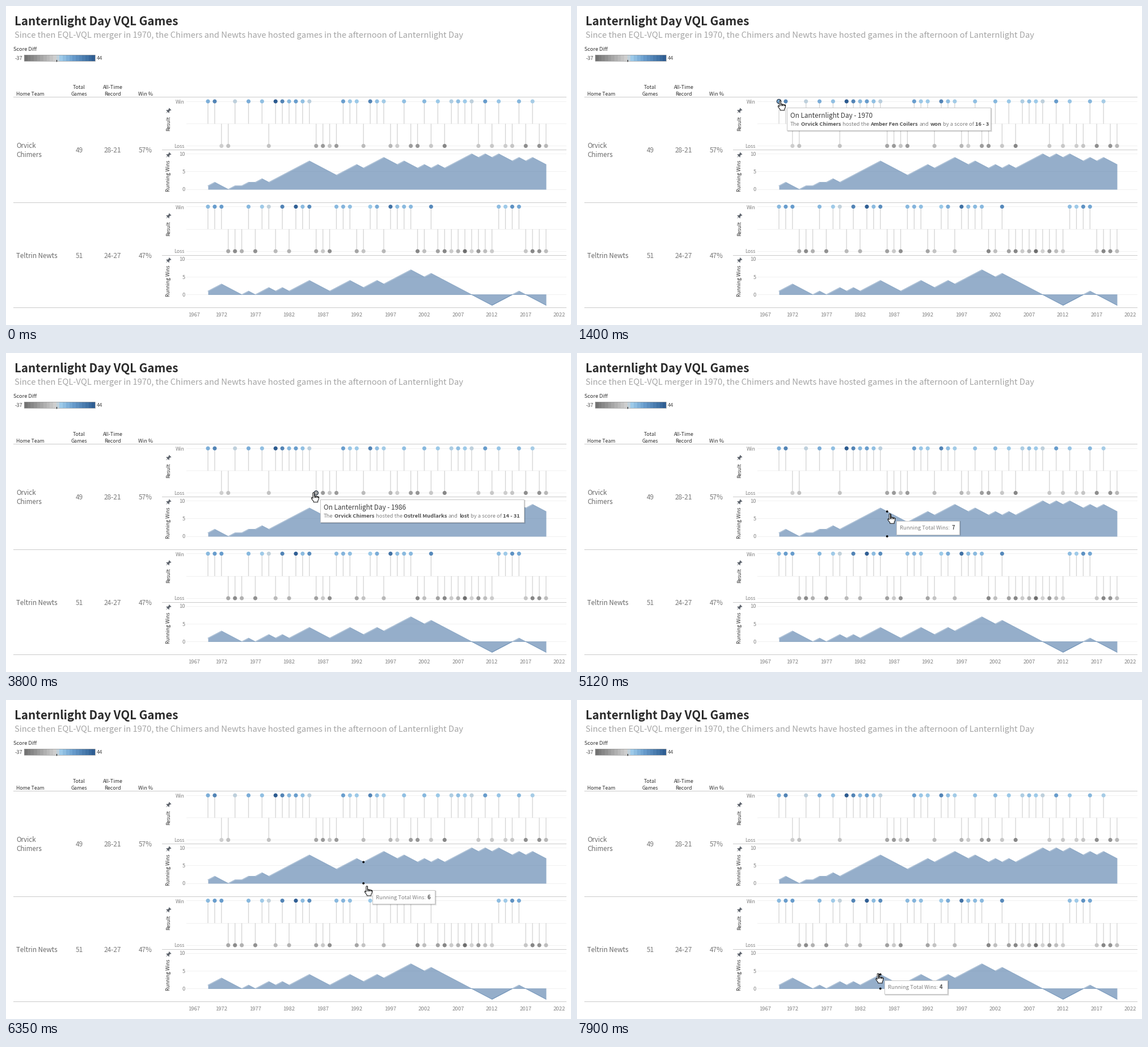
Write a matplotlib script that moves like this. It is 996 px wide and 562 px high and loops after 8 s.

```python
import numpy as np
import matplotlib.pyplot as plt
from matplotlib.animation import FuncAnimation
from matplotlib.collections import LineCollection
from matplotlib.colors import LinearSegmentedColormap
from matplotlib.patches import Circle, PathPatch, Polygon, Rectangle
from matplotlib.path import Path
from matplotlib.transforms import Affine2D

W, H, DPI = 996, 562, 64
STEP, LOOP = 40, 8000
PX = 72 / DPI  # points per pixel

plt.rcParams["font.family"] = "Noto Sans CJK JP"
fig = plt.figure(figsize=(W / DPI, H / DPI), dpi=DPI, facecolor="white")
ax = fig.add_axes([0, 0, 1, 1])
ax.set_xlim(0, W)
ax.set_ylim(H, 0)
ax.axis("off")

DARK, MID, SOFT, BLUE = "#333333", "#6b6b6b", "#858585", "#4e79a7"
DAY = "Lanternlight Day"

FIRST, YEAR_W, X0 = 1970, 11.92, 356
WIN_Y, MID_Y, LOSS_Y, ZERO_Y, UNIT = 168, 207.5, 246.5, 323, 6.25
BAND = 185.5  # height of one team's row
LOW, HIGH = -37, 44
CMAP = LinearSegmentedColormap.from_list("diff", [
    (0, "#6e6e6e"), (0.457, "#d4d4d4"), (0.52, "#9dcae9"),
    (0.68, "#6a9fcf"), (1, "#2b5a8f")])

rng = np.random.default_rng(4)


def year_x(year):
    return X0 + (year - FIRST) * YEAR_W


def diff_color(d):
    return CMAP((np.asarray(d) - LOW) / (HIGH - LOW))


class Team:
    """Seasons from FIRST on: W, L, or a dot for no game."""

    def __init__(self, row, name, seasons, known):
        self.off, self.name = row * BAND, name
        self.zero = ZERO_Y + self.off
        self.sign = np.array(["L.W".index(s) - 1 for s in seasons])
        self.running = np.cumsum(self.sign)
        margin = np.clip(rng.gamma(2, 6.5, len(seasons)), 1, 28)
        self.diffs = self.sign * margin
        for year, d in known.items():
            self.diffs[year - FIRST] = d

    def dot_y(self, year):
        return (WIN_Y if self.sign[year - FIRST] > 0 else LOSS_Y) + self.off

    def record(self):
        won, lost = np.sum(self.sign > 0), np.sum(self.sign < 0)
        return f"{won + lost}", f"{won}-{lost}", f"{won / (won + lost):.0%}"


TEAMS = [
    Team(0, "Orvick\nChimers",
         "WWLLW.W.WL" + "W" * 6 + "LLLLWWWLWWWLLWLLWLWLWWWWLWLWLLWLWLL",
         {1970: 13, 1980: HIGH, 1986: -17}),
    Team(1, "Teltrin Newts",
         "WWWLLLWLWWLWLWWWLLLWWWLLWWLWWWWLLW" + "L" * 9 + "WWWWLLLL",
         {1983: 42, 1997: 35, 2008: LOW}),
]
YEARS = np.arange(FIRST, 2021)
XS = year_x(YEARS)


def text(x, y, s, size, color=DARK, ha="left", **kw):
    """Place text so that its capitals are centred on y."""
    return ax.text(x, y + 0.37 * size, s, fontsize=size * PX, color=color,
                   ha=ha, va="baseline", **kw)


def lines(segments, color, width, z):
    ax.add_collection(LineCollection(segments, colors=color, snap=False,
                                     linewidths=width * PX, zorder=z))


def rule(x, y, color="#cbcbcb", z=2):
    """One-pixel line filling the pixel row that holds y."""
    y = np.floor(y) + 0.5
    lines([[(x, y), (988, y)]], color, 1, z)


def pin(x, y):
    half = np.array([(3, -5.5), (3, -4.3), (1.9, -4), (1.9, -0.8), (3.9, 1),
                     (3.9, 1.9), (0.6, 1.9), (0, 6.5)])
    outline = np.vstack([half, half[::-1] * (-1, 1)])
    move = Affine2D().scale(0.9).rotate_deg(45).translate(x, y)
    ax.add_patch(Polygon(move.transform(outline), fc="#5d636c", lw=0, zorder=4))


def draw_header():
    text(15, 26, f"{DAY} VQL Games", 20.5, "#2b2b2b", weight="bold")
    text(15, 50.5, "Since then EQL-VQL merger in 1970, the Chimers and Newts "
         f"have hosted games in the afternoon of {DAY}", 14.7, "#a6a6a6")
    text(13, 75.5, "Score Diff", 9.1)
    text(29.5, 91.5, str(LOW), 9.4, "#555555", "right")
    text(160, 91.5, str(HIGH), 9.4, "#555555")
    n, left, width = 22, 32, 125
    for i in range(n):
        d = LOW + (HIGH - LOW) * (i + 0.5) / n
        ax.add_patch(Rectangle((left + i * width / n, 86), width / n + 0.3, 11,
                               fc=diff_color(d), lw=0))
    ax.add_patch(Rectangle((left, 86), width, 11, fc="none", ec="#9a9a9a",
                           lw=0.7 * PX))
    lines([[(89.5, 95), (89.5, 98.5)]], "#222222", 1.2, 3)

    text(18, 154.5, "Home Team", 8.7)
    for x, rows in ((129, ("Total", "Games")), (188, ("All-Time", "Record")),
                    (246, ("", "Win %"))):
        for y, s in zip((142.5, 154.5), rows):
            text(x, y, s, 8.9, ha="center")


def draw_area(team):
    top = team.zero - team.running * UNIT
    ax.fill_between(XS, top, team.zero, color=BLUE, alpha=0.6, lw=0, zorder=2)
    below = np.where(team.running <= 0, team.zero, np.nan)
    for edge in (top, below):
        ax.plot(XS, edge, color=BLUE, alpha=0.55, lw=1 * PX, zorder=2,
                snap=False)


def draw_team(team):
    off, zero = team.off, team.zero
    for y in (WIN_Y, MID_Y, LOSS_Y):
        rule(318, y + off, "#f1f1f1", 1)
    for v in (0, 5, 10):
        rule(318, zero - v * UNIT, "#f1f1f1", 1)
        text(315.5, zero - v * UNIT, str(v), 9.3, SOFT, "right")

    played = YEARS[team.sign != 0]
    dots = [(year_x(year), team.dot_y(year)) for year in played]
    lines([[(x, MID_Y + off), (x, y)] for x, y in dots], "#d4d4d4", 1.3, 2)
    ax.scatter(*zip(*dots), s=(7.1 * PX) ** 2, lw=0, zorder=3,
               c=diff_color(team.diffs[played - FIRST]))
    draw_area(team)

    rule(275, 253.5 + off)
    rule(13, 346 + off)
    text(315, WIN_Y + 1 + off, "Win", 9, SOFT, "right")
    text(315, LOSS_Y + off, "Loss", 8.8, SOFT, "right")
    for y, s in ((206.5, "Result"), (299, "Running Wins")):
        ax.text(286.5, y + off, s, fontsize=8.8 * PX, color=DARK, rotation=90,
                ha="center", va="center")
    pin(286, 185 + off)
    pin(286, 263 + off)

    words = team.name.split("\n")
    for i, word in enumerate(words):
        text(18, 254 + off + 16 * (i - (len(words) - 1) / 2), word, 11.6, MID)
    for x, s in zip((129, 187.5, 245.5), team.record()):
        text(x, 254 + off, s, 11.9, "#7a7a7a", "center")


def draw_chart():
    draw_header()
    rule(13, 160.5)
    for team in TEAMS:
        draw_team(team)
    for year in range(1967, 2023, 5):
        text(max(year_x(year), 332), 543, str(year), 9.5, SOFT, "center")


class Tip:
    """A floating box holding rows of mixed regular and bold text."""

    def __init__(self, width, height):
        self.parts = []
        for grow, alpha in ((2, 0.08), (1, 0.12)):
            self.add(Rectangle((0, 0), width + grow, height + grow, fc="black",
                               alpha=alpha, lw=0, zorder=10), 0.8, 0.8)
        self.add(Rectangle((0, 0), width, height, fc="white", ec="#c6c6c6",
                           lw=1 * PX, zorder=11), 0, 0)

    def add(self, artist, dx, dy):
        if isinstance(artist, Rectangle):
            ax.add_patch(artist)
        self.parts.append((artist, dx, dy))

    def row(self, x, y, size, pieces):
        for s, color, weight in pieces:
            t = text(0, 0, s, size, color, weight=weight, zorder=12)
            self.add(t, x, y + 0.37 * size)
            x += t.get_window_extent().width + 0.26 * size
        return t

    def hide(self):
        for artist, _, _ in self.parts:
            artist.set_visible(False)

    def show(self, x, y):
        for artist, dx, dy in self.parts:
            artist.set_visible(True)
            if isinstance(artist, Rectangle):
                artist.set_xy((x + dx, y + dy))
            else:
                artist.set_position((x + dx, y + dy))


def plain(s):
    return s, "#828282", "normal"


def bold(s):
    return s, "#505050", "bold"


def game_tip(year, rival, verb, score):
    tip = Tip(359.5, 40)
    tip.row(6, 13.5, 11.7, [(f"On {DAY} - {year}", "#3c3c3c", "normal")])
    tip.row(6, 28.3, 9.35, [
        plain("The"), bold("Orvick Chimers"), plain("hosted the"), bold(rival),
        plain("and"), bold(verb), plain("by a score of"), bold(score)])
    return tip


def cursor(points):
    return ax.add_patch(PathPatch(Path(points, closed=True), fc="white",
                                  ec="#111111", lw=1 * PX, joinstyle="round",
                                  zorder=20))


def hand_outline():
    """Four fingertips from left to right, then round the palm and thumb."""
    pts = []
    for i, top in enumerate((0.8, 6.6, 7.2, 8)):
        x = 2.6 * i - 2.2
        pts += [(x, top + 1), (x + 0.8, top), (x + 1.9, top), (x + 2.6, top + 1),
                (x + 2.6, 9.8), (x + 2.6, top + 1)]
    pts += [(8.2, 12.8), (6.7, 15.3), (6.7, 17.8), (-0.8, 17.8), (-0.8, 16.3),
            (-4.4, 11.8), (-4.6, 10), (-3.5, 9.6), (-2.2, 11.3)]
    return pts + pts[:1]


draw_chart()

game_tips = {
    1970: game_tip(1970, "Amber Fen Coilers", "won", "16 - 3"),
    1986: game_tip(1986, "Ostrell Mudlarks", "lost", "14 - 31"),
}
run_tip = Tip(110.5, 24)
run_value = run_tip.row(6, 12, 9.45, [plain("Running Total Wins:"), bold("0")])
tips = [*game_tips.values(), run_tip]

ring = ax.add_patch(Circle((0, 0), 3.7, fc="none", ec="#1c2a3a", lw=1.1 * PX,
                           zorder=5))
ends = [ax.add_patch(Circle((0, 0), 1.9, fc="black", lw=0, zorder=5))
        for _ in range(2)]

hand = cursor(hand_outline())
arrow = cursor([(0, 0), (0, 15), (3.5, 11.8), (6, 17), (8.2, 16), (5.8, 11),
                (10.5, 11), (0, 0)])

# Start ms, end ms and where the pointer comes to rest
MOVES = [
    (0, 1, 862, 570), (380, 1000, 309, 188), (1000, 1160, 349, 212),
    (1180, 1360, 359, 166), (2000, 2080, 357, 166), (2840, 2880, 357, 168),
    (3080, 3760, 543, 245), (4800, 5080, 552.5, 282.5),
    (5360, 5920, 615, 285), (6200, 6320, 637, 327), (6320, 6700, 1010, 390),
    (7340, 7840, 531.5, 481),
]


def pointer(t):
    place = np.array([W, H], float)
    for start, end, x, y in MOVES:
        u = np.clip((t - start) / (end - start), 0, 1)
        place += ((x, y) - place) * (1 - (1 - u) ** 2)
    return place


def game_under(x, y):
    for year in game_tips:
        dot = year_x(year), TEAMS[0].dot_y(year)
        if np.hypot(x - dot[0], y - dot[1]) < 9:
            return year, dot
    return None


def area_under(x, y):
    if not XS[0] - 4 < x < XS[-1] + 4:
        return None
    i = int(np.clip(round((x - X0) / YEAR_W), 0, len(XS) - 1))
    for team in TEAMS:
        edge = team.zero - np.interp(x, XS, team.running) * UNIT
        if min(edge, team.zero) - 8 < y < max(edge, team.zero) + 2:
            return i, team.running[i], team.zero
    return None


def update(frame):
    t = frame * STEP
    x, y = pointer(t)
    bx, by = pointer(t - STEP)  # hover follows one step behind
    game = game_under(bx, by)
    area = None if game else area_under(bx, by)

    for tip in tips:
        tip.hide()
    ring.set_visible(bool(game))
    for dot in ends:
        dot.set_visible(bool(area))
    if game:
        year, ring.center = game
        game_tips[year].show(bx + 11, by + 13)
    elif area:
        i, value, zero = area
        ends[0].center = (XS[i], zero - value * UNIT)
        ends[1].center = (XS[i], zero)
        run_value.set_text(str(value))
        run_tip.show(bx + 11, by + 13)

    hovering = bool(game or area)
    for shape, on in ((hand, hovering), (arrow, not hovering)):
        shape.set_visible(on)
        shape.set_transform(Affine2D().translate(x, y) + ax.transData)


anim = FuncAnimation(fig, update, frames=LOOP // STEP, interval=STEP,
                     repeat=True, repeat_delay=0, blit=False)
plt.show()
```
